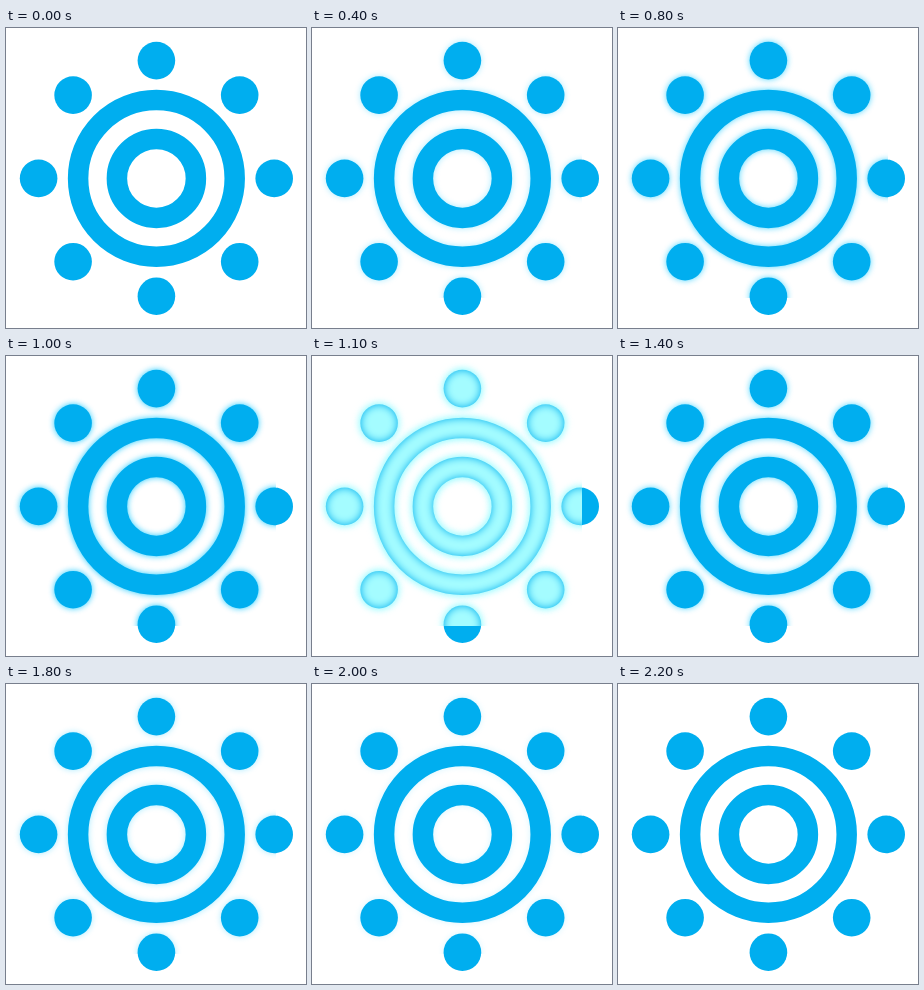
Animation of 300x300 px, one loop 2.3 s. Source, as an HTML page:

```html
<!DOCTYPE html>
<html lang="en">
<head>
<meta charset="utf-8">
<title>Pulsing sun</title>
<style>
html, body { margin: 0; width: 100%; height: 100%; overflow: hidden; background: #fff; }
svg { display: block; width: 100vw; height: 100vh; }
</style>
</head>
<body>
<svg viewBox="0 0 300 300">
  <defs>
    <filter id="halo" filterUnits="userSpaceOnUse" width="300" height="300" color-interpolation-filters="sRGB">
      <feGaussianBlur stdDeviation="3"/>
    </filter>
    <filter id="soft" filterUnits="userSpaceOnUse" width="300" height="300" color-interpolation-filters="sRGB">
      <feGaussianBlur stdDeviation="4"/>
    </filter>
    <g id="sun" transform="translate(150.4 150.4)">
      <g fill="none" stroke="currentColor" stroke-width="20.5">
        <circle r="78.3"/>
        <circle r="39.5"/>
      </g>
      <g id="dots" fill="currentColor"></g>
    </g>
  </defs>
  <use id="glow" href="#sun" filter="url(#halo)"/>
  <use href="#sun" color="#00aeef"/>
  <use id="flash" href="#sun" color="#a4fcff" filter="url(#soft)"/>
</svg>
<script>
const LOOP = 2300, PEAK = 1100;
const $ = id => document.getElementById(id);

$('dots').innerHTML = Array.from({ length: 8 }, (_, i) =>
  `<circle cx="117.8" r="18.8" transform="rotate(${i * 45})"/>`).join('');

function draw(now) {
  const t = now % LOOP;
  const flash = t >= PEAK && t < PEAK + 100;
  // The glow climbs in 200 ms steps, then falls back the same way.
  const level = t < PEAK ? Math.floor(t / 200) : Math.floor((LOOP - 1 - t + 100) / 200);
  const glow = $('glow');
  glow.setAttribute('color', flash ? '#66faff' : '#00c4ff');
  glow.setAttribute('opacity', flash ? 0.6 : Math.max(0, Math.min(5, level)) * 0.17);
  $('flash').setAttribute('opacity', flash ? 1 : 0);
}

const start = performance.now();
function tick() {
  draw(performance.now() - start);
  requestAnimationFrame(tick);
}
tick();
</script>
</body>
</html>
```
